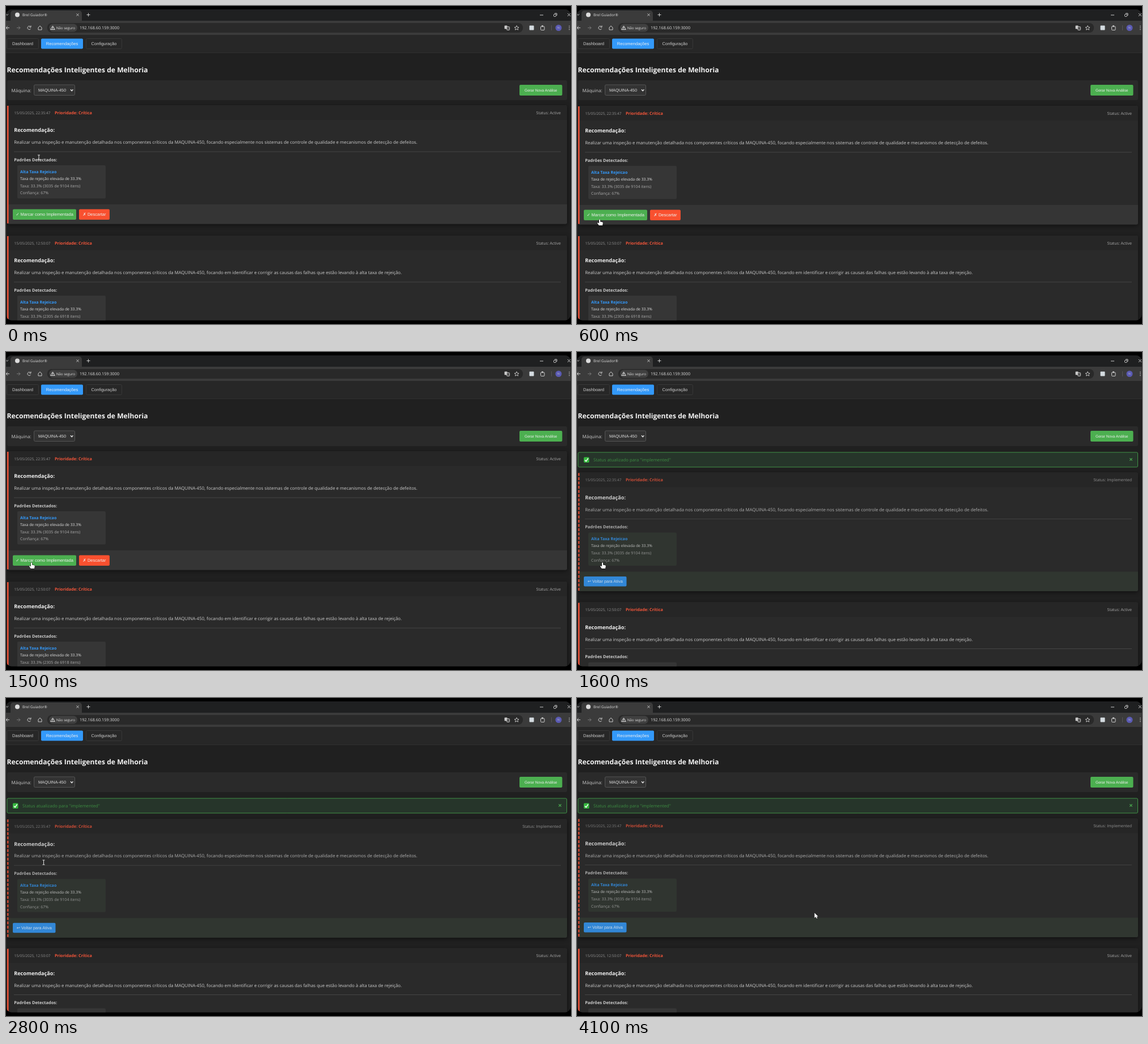
Recreate the animation shown at these times as an HTML page with a canvas. Size 998 px wide and 561 px high, loop 4200 ms.

```html
<!DOCTYPE html>
<html lang="pt">
<head>
<meta charset="utf-8">
<style>
html, body { margin: 0; width: 100%; height: 100%; overflow: hidden; background: #000; }
canvas { display: block; }
</style>
</head>
<body>
<canvas id="stage" width="998" height="561"></canvas>
<script>
const ctx = document.getElementById('stage').getContext('2d');
const LOOP = 4200, STEP = 100, DONE_AT = 1600;
const UI = '"Open Sans", "Noto Sans", sans-serif';
const CONTROL = '"Liberation Sans", Arial, "DejaVu Sans", sans-serif';
const RED = '#f1553a', GREEN = '#4caf50', BLUE = '#3399fa';

// Pointer keys: time, x, y (hot spot)
const path = [
  [0, 58, 267], [200, 54, 300], [400, 43, 366], [600, 40, 376], [900, 42, 381],
  [1200, 45, 373], [1500, 45, 371], [1900, 45, 371], [2300, 54, 330],
  [2800, 66.5, 290], [3100, 88, 308], [3400, 120, 342], [3700, 230, 358], [4100, 419.5, 379]
];

// First card sinks slightly while the pointer is off it: time, offset
const lift = [[0, 0], [400, 0], [600, 1], [1000, 1], [1200, 0], [2500, 0], [2700, .8], [2800, .8], [3000, 0], [4200, 0]];

const cards = [
  { date: '15/05/2025, 22:35:47', tail: 'focando especialmente nos sistemas de controle de qualidade e mecanismos de detecção de defeitos.', items: '3035 de 9104' },
  { date: '15/05/2025, 12:50:07', tail: 'focando em identificar e corrigir as causas das falhas que estão levando à alta taxa de rejeição.', items: '2305 de 6918' }
];

function sample(keys, t) {
  const i = keys.findIndex(k => k[0] > t);
  if (i < 0) return keys[keys.length - 1].slice(1);
  const a = keys[i - 1], b = keys[i], u = (t - a[0]) / (b[0] - a[0]);
  return a.slice(1).map((v, n) => v + (b[n + 1] - v) * u);
}

function box(x, y, w, h, fill, r = 0, stroke) {
  ctx.beginPath();
  ctx.roundRect(x, y, w, h, r);
  if (fill) { ctx.fillStyle = fill; ctx.fill(); }
  if (stroke) { ctx.strokeStyle = stroke; ctx.lineWidth = 1; ctx.stroke(); }
}

// y is the middle of the capitals
function text(str, x, y, size, color, { font = UI, weight = 400, align = 'left' } = {}) {
  ctx.font = `${weight} ${size}px ${font}`;
  ctx.textAlign = align;
  ctx.fillStyle = color;
  ctx.fillText(str, x, y + size * .35);
}

function line(points, color = '#ccc', width = 1, close = false) {
  ctx.beginPath();
  points.forEach(([x, y]) => ctx.lineTo(x, y));
  if (close) ctx.closePath();
  ctx.strokeStyle = color;
  ctx.lineWidth = width;
  ctx.stroke();
}

function disc(x, y, r, fill) {
  ctx.beginPath();
  ctx.arc(x, y, r, 0, 7);
  ctx.fillStyle = fill;
  ctx.fill();
}

function button(label, x, y, w, h, fill, size = 7.5, stroke) {
  box(x, y, w, h, fill, 2, stroke);
  text(label, x + w / 2, y + h / 2, size, fill ? '#eee' : '#ccc', { font: CONTROL, align: 'center' });
}

function browserBar() {
  box(0, 6, 998, 21, '#1f2021');
  box(8, 8, 126, 24, '#3b3b3b', 5);
  box(0, 26, 998, 25, '#3b3b3b');
  line([[0, 14], [2, 16.5], [4, 14]], '#aaa');
  disc(20, 15.5, 4, '#ddd');
  text('Brel Guiador®', 29, 15.8, 6.5, '#ddd');
  line([[124.5, 13.5], [128.5, 17.5]]);
  line([[128.5, 13.5], [124.5, 17.5]]);
  line([[142.5, 15.5], [148.5, 15.5]]);
  line([[145.5, 12.5], [145.5, 18.5]]);
  line([[943, 16], [949, 16]]);
  box(967.5, 14.5, 4, 4, null, 1, '#ccc');
  line([[969, 13], [973, 13], [973, 17]]);
  line([[992, 13], [997, 18]]);
  line([[997, 13], [992, 18]]);

  box(73, 30, 840, 17, '#292929', 8);
  for (const [x, d, color] of [[3, 1, '#ccc'], [22, -1, '#777']]) {
    line([[x - 3 * d, 38.5], [x + 3 * d, 38.5]], color);
    line([[x, 35.5], [x - 3 * d, 38.5], [x, 41.5]], color);
  }
  ctx.beginPath();
  ctx.arc(41, 38.5, 3, .5, 5.5);
  ctx.strokeStyle = '#ccc';
  ctx.stroke();
  line([[44, 34.5], [44, 37.3], [41.3, 37.3]]);
  line([[57, 38], [60, 35], [63, 38], [63, 42], [57, 42]], '#ccc', 1, true);
  box(76, 31.5, 50, 14, '#404040', 7);
  line([[82.5, 35], [86.3, 41.5], [78.7, 41.5]], '#ddd', 1, true);
  line([[82.5, 37], [82.5, 40.5]], '#ddd');
  text('Não seguro', 88.7, 38.6, 6.2, '#ddd');
  text('192.168.60.159:3000', 130, 38.6, 7.27, '#ddd');

  box(880.5, 34.5, 5, 6, '#ccc', 1);
  box(884.5, 36.5, 5, 6, '#555', 1, '#bbb');
  const star = Array.from({ length: 10 }, (_, i) => {
    const a = i * Math.PI / 5 - Math.PI / 2, r = i % 2 ? 1.9 : 4.2;
    return [902 + r * Math.cos(a), 38.8 + r * Math.sin(a)];
  });
  line(star, '#ccc', .9, true);
  box(924.5, 34.5, 8, 8, '#d4dbe0', 1);
  box(944.5, 36, 6.5, 6.5, null, 1, '#ccc');
  disc(947.5, 35.5, 1.4, '#ccc');
  line([[963.5, 34], [963.5, 43]], '#555');
  disc(976, 38.5, 5.5, '#5b5bb4');
  text('N', 976, 38.6, 5, '#ccc', { align: 'center' });
  [35.5, 38.5, 41.5].forEach(y => disc(995, y, .8, '#ccc'));
}

function pageTop() {
  box(0, 51, 998, 31, '#272727');
  box(0, 82, 998, 1, '#303030');
  button('Dashboard', 1.5, 57.5, 56, 18, null, 7.6, '#383838');
  button('Recomendações', 62, 57.5, 74, 18, BLUE);
  button('Configuração', 141.5, 57.5, 63, 18, null, 7.55, '#383838');
  text('Recomendações Inteligentes de Melhoria', 1.5, 113, 12.15, '#f4f4f4', { weight: 700 });
  box(2, 131, 989, 35, '#2a2a2a', 3);
  text('Máquina:', 9.5, 148.7, 8, '#ccc');
  box(49.5, 139, 72, 18.5, '#333', 2, '#555');
  text('MAQUINA-450', 57, 148.5, 7.35, '#ddd', { font: CONTROL });
  line([[114, 147.3], [116.2, 149.7], [118.4, 147.3]], '#eee', 1.3);
  button('Gerar Nova Análise', 907, 139, 75.5, 19, GREEN, 6.65);
}

function banner() {
  box(2, 177, 988.5, 26, '#26352a', 2, '#419146');
  box(12, 185.5, 9.5, 9.5, '#35b83e', 1.5);
  line([[14, 190.5], [16, 192.8], [19.7, 187.5]], '#fff', 1.4);
  text('Status atualizado para "implemented"', 29, 190.4, 7.75, '#3d8c42');
  line([[976.3, 187.3], [980.7, 191.7]], GREEN, 1.2);
  line([[980.7, 187.3], [976.3, 191.7]], GREEN, 1.2);
}

function card({ date, tail, items }, y, done) {
  const bold = { weight: 700 };
  ctx.save();
  ctx.translate(0, y);
  ctx.shadowColor = 'rgba(0,0,0,.5)';
  ctx.shadowBlur = 7;
  ctx.shadowOffsetY = 2;
  box(2, 0, 989, 209.5, '#2a2a2a', 3);
  ctx.shadowColor = 'transparent';
  box(4, 0, 987, 26, '#262626', [0, 3, 0, 0]);
  box(4, 175, 987, 34.5, done ? '#303630' : '#353535', [0, 0, 3, 0]);
  ctx.setLineDash(done ? [5, 2.5] : []);
  line([[3.2, 1], [3.2, 208.5]], done ? '#d04c35' : RED, 2.6);
  ctx.setLineDash([]);
  if (done) ctx.globalAlpha = .82;

  text(date, 14.5, 13.3, 6.55, '#909090');
  text('Prioridade: Crítica', 86, 13.3, 7.31, RED, bold);
  text(done ? 'Status: Implemented' : 'Status: Active', 980, 13.3, 7, '#aaa', { align: 'right' });
  text('Recomendação:', 14.2, 44.2, 9.14, '#f0f0f0', bold);
  text('Realizar uma inspeção e manutenção detalhada nos componentes críticos da MAQUINA-450, ' + tail, 14.2, 65.4, 7.83, '#ccc');
  box(14, 81.5, 966, 1, '#454545');
  text('Padrões Detectados:', 14.2, 96, 7.45, '#ccc', bold);
  box(20, 106, 156, 58.5, done ? '#313731' : '#363636', 2);
  text('Alta Taxa Rejeicao', 25, 117.2, 7.13, BLUE, bold);
  text('Taxa de rejeição elevada de 33.3%', 25, 129.6, 6.83, '#ddd');
  text(`Taxa: 33.3% (${items} itens)`, 25, 142.3, 7.05, '#aaa');
  text('Confiança: 67%', 25, 155, 7, '#aaa');
  if (done) {
    button('↩\uFE0E Voltar para Ativa', 12, 183.5, 75.5, 17.5, BLUE, 7.4);
  } else {
    button('✓ Marcar como Implementada', 12, 183.5, 112, 18.5, GREEN);
    button('✗ Descartar', 129, 183.5, 54, 18.5, '#f9502f');
  }
  ctx.restore();
}

const shapes = {
  arrow: 'M0 0V9L2.2 7L3.7 10L5.2 9.3L3.8 6.4H6.5Z',
  hand: 'M-1 1Q0-.6 1 1V4.5L4.5 5.2Q6 5.5 5.8 7L5 11H-1.2L-4 7.2Q-3.6 5.8-2.2 6.6L-1 7.6Z'
};

function pointer(kind, x, y) {
  ctx.save();
  ctx.translate(x, y);
  if (kind === 'beam') {
    line([[0, -4], [0, 4]], '#ddd', 1);
    line([[-2, -4], [2, -4]], '#ddd', 1);
    line([[-2, 4], [2, 4]], '#ddd', 1);
  } else {
    const shape = new Path2D(shapes[kind]);
    ctx.strokeStyle = '#111';
    ctx.lineWidth = 1;
    ctx.fillStyle = '#fff';
    ctx.stroke(shape);
    ctx.fill(shape);
  }
  ctx.restore();
}

function pointerKind(t) {
  if (t < 300) return 'beam';
  if (t < 400) return 'arrow';
  if (t < 1900) return 'hand';
  return t < 3500 ? 'beam' : 'arrow';
}

function draw(now) {
  const t = Math.floor(now % LOOP / STEP) * STEP;
  const done = t >= DONE_AT;
  ctx.textRendering = 'geometricPrecision';
  ctx.fillStyle = '#000';
  ctx.fillRect(0, 0, 998, 561);
  ctx.save();
  box(0, 6, 997.5, 548.5, '#202020', 10);
  ctx.clip();
  browserBar();
  pageTop();
  if (done) banner();
  card(cards[0], (done ? 212.5 : 175) + sample(lift, t)[0], done);
  card(cards[1], done ? 441.5 : 405, false);
  pointer(pointerKind(t), ...sample(path, t));
  ctx.restore();
  requestAnimationFrame(draw);
}
requestAnimationFrame(draw);
</script>
</body>
</html>
```
